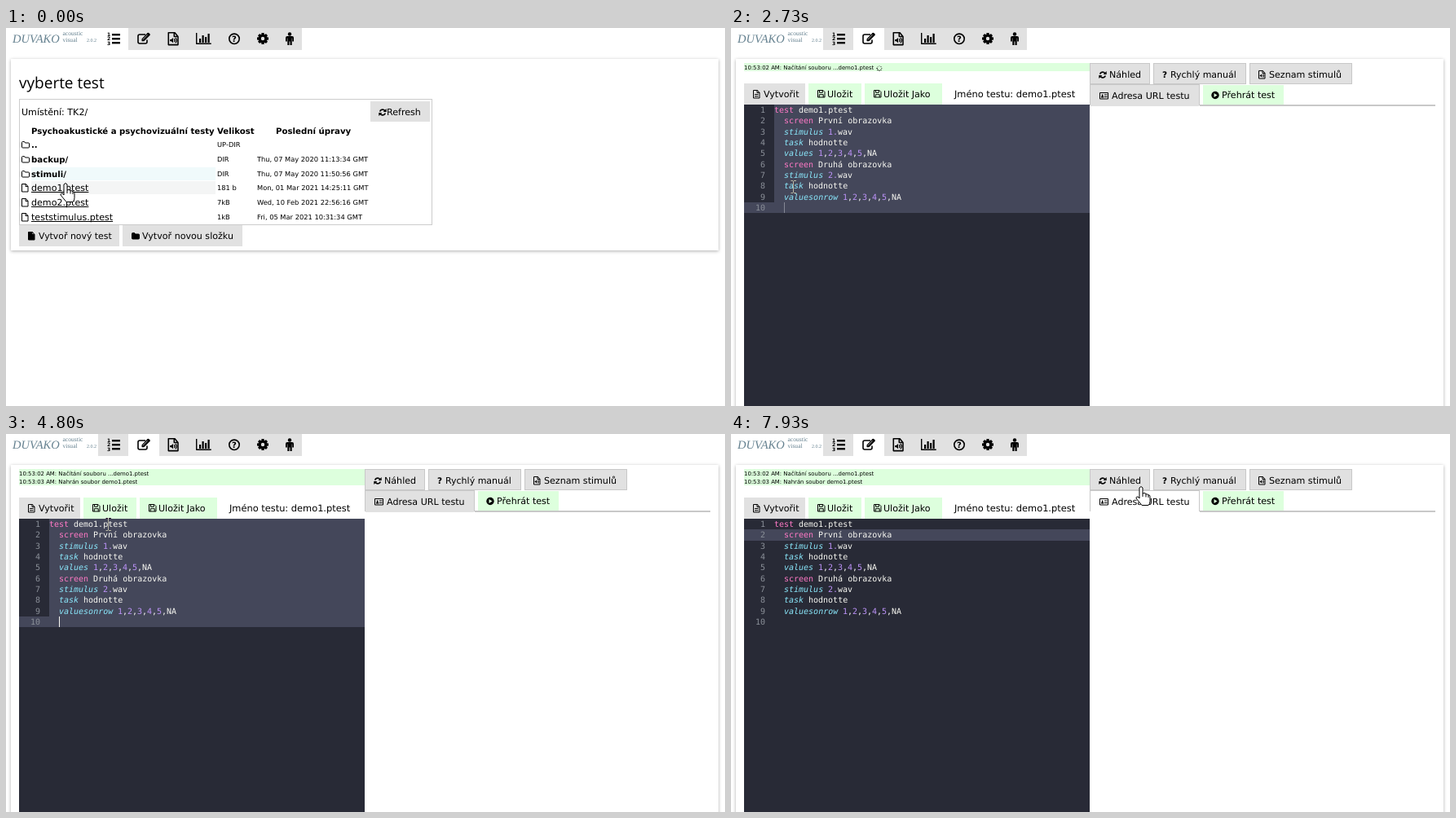
Write an HTML page with a canvas that moves like this. It is 882x464 px and loops after 8 s.

```html
<!DOCTYPE html>
<html lang="cs">
<head>
<meta charset="utf-8">
<title>Editor testů</title>
<style>
html, body { margin: 0; width: 100%; height: 100%; overflow: hidden; background: #fff; }
canvas { display: block; }
</style>
</head>
<body>
<canvas id="stage" width="882" height="464"></canvas>
<script>
const ctx = document.getElementById('stage').getContext('2d');
ctx.textRendering = 'geometricPrecision';

const LOOP = 8000, OPEN = 1530, LOADED = 2900, FOCUS = 4730, CLICK1 = 4865, CLICK2 = 6070;
const SANS = '"DejaVu Sans", sans-serif', SERIF = '"Liberation Serif", serif', MONO = '"DejaVu Sans Mono", monospace';
const GRAY = '#e1e1e1', GREEN = '#ddffdd', DARK = '#282a36', SELECTED = '#44475a';
const ROW = 13.33;

const ramp = (t, from, to) => Math.max(0, Math.min(1, (t - from) / (to - from)));

function box(x, y, w, h, color) {
  ctx.fillStyle = color;
  ctx.fillRect(x, y, w, h);
}
function write(str, x, y, font = '11.1px ' + SANS, color = '#000', align = 'left') {
  ctx.font = font;
  ctx.fillStyle = color;
  ctx.textAlign = align;
  ctx.fillText(str, x, Math.round(y));
}
function shape(d, x, y, { fill, stroke, width = 1, scale = 1 }) {
  const path = new Path2D(d);
  ctx.save();
  ctx.translate(x, y);
  ctx.scale(scale, scale);
  ctx.lineJoin = 'round';
  if (fill) { ctx.fillStyle = fill; ctx.fill(path, 'evenodd'); }
  if (stroke) { ctx.strokeStyle = stroke; ctx.lineWidth = width; ctx.stroke(path); }
  ctx.restore();
}
function disc(x, y, r, color = '#000') {
  ctx.fillStyle = color;
  ctx.beginPath();
  ctx.arc(x, y, r, 0, 7);
  ctx.fill();
}
function arc(x, y, r, from, to, width) {
  ctx.strokeStyle = '#000';
  ctx.lineWidth = width;
  ctx.beginPath();
  ctx.arc(x, y, r, from, to);
  ctx.stroke();
}

// Icons
const SOLID = { fill: '#000' }, LINE = { stroke: '#000' }, BOTH = { fill: '#000', stroke: '#000' };
const folder = (x, y, style = LINE) => shape('M.5 1.5q0-1 1-1h2l1 1.5h4q1 0 1 1v4q0 1-1 1h-7q-1 0-1-1z', x, y, style);
const page = (x, y, style = LINE) => shape('M.5.5h5l2.5 3v6.5h-7.5zM5 .5v3h3', x, y, style);
const textPage = (x, y) => { page(x, y); shape('M2 5.5h4.5M2 7.8h4.5', x, y, LINE); };
const soundPage = (x, y, scale = 1) => {
  page(x, y, { stroke: '#000', scale });
  shape('M1.7 5.8h1l1.5-1.3v4l-1.5-1.3h-1z', x, y, { fill: '#000', scale });
  shape('M5 5.3q1 1.2 0 2.4M6 4.4q1.8 2 0 4.2', x, y, { stroke: '#000', width: .8, scale });
};
const floppy = (x, y) => shape('M.5.5h6.5l2 2v6.5h-8.5zM2.5.5v2.8h3.8v-2.8M2.3 9v-3.3h4.9v3.3', x, y, LINE);
function refresh(x, y) {
  arc(x, y, 3.4, 3.4, 5.8, 1.6);
  arc(x, y, 3.4, .3, 2.7, 1.6);
  shape('M4.7-4.5v4h-4zM-4.7 4.5v-4h4z', x, y, SOLID);
}
function gear(x, y) {
  ctx.save();
  ctx.translate(x, y);
  for (let i = 0; i < 8; i++) {
    box(-1.6, -7, 3.2, 4, '#000');
    ctx.rotate(Math.PI / 4);
  }
  ctx.restore();
  arc(x, y, 3.9, 0, 7, 3.4);
}

function navigation(t) {
  const steel = '#64808f';
  write('DUVAKO', 8, 18, 'italic 14.5px ' + SERIF, steel);
  write('acoustic', 69.5, 9, '7.6px ' + SERIF, steel);
  write('visual', 69.5, 17, '7.6px ' + SERIF, steel);
  write('2.0.2', 99, 17, '6px ' + SERIF, steel);

  const opened = ramp(t, OPEN, OPEN + 500);
  box(188, 0, 175, 27, GRAY);
  box(113, 0, 37, 27, `rgba(225,225,225,${opened})`);
  box(150, 0, 38, 27, `rgba(225,225,225,${1 - opened})`);

  for (let i = 0; i < 3; i++) {
    write(i + 1, 124, 10 + i * 5.4, 'bold 6px ' + SANS);
    box(130, 7 + i * 5, 10, 2.4, '#000');
  }
  shape('M10 1.5H3q-2 0-2 2v7q0 2 2 2h7q2 0 2-2V8', 161, 6.5, { stroke: '#000', width: 1.6 });
  shape('M5 7.5l7-7.5q1-.7 2 .3l1 1q.8 1 0 1.7l-7.2 7.2H5z', 161.5, 6, SOLID);
  shape('M6.3 8l5.7-6', 161.5, 6.2, { stroke: '#eee', width: .7 });
  soundPage(198.5, 5, 1.56);
  shape('M.7 0v13.3h18', 233, 6, { stroke: '#000', width: 1.4 });
  [5, 9, 7, 11].forEach((h, i) => box(237 + i * 3.5, 18 - h, 2.2, h, '#000'));
  arc(280, 13.3, 6.2, 0, 7, 1.6);
  write('?', 280, 17, 'bold 10px ' + SANS, '#000', 'center');
  gear(315, 13);
  disc(348, 7.5, 2.2);
  shape('M-3 0h6q2 0 2 2v4.5h-1.8v-4h-.5v8.5h-2.2v-4.5h-1v4.5h-2.2v-8.5h-.5v4H-5v-4.5q0-2 2-2z', 348, 10, SOLID);
}

function card(height) {
  ctx.save();
  ctx.shadowColor = 'rgba(0,0,0,.32)';
  ctx.shadowBlur = 4;
  ctx.shadowOffsetY = 1;
  box(6, 38, 868, height, '#fff');
  ctx.restore();
}

const FILES = [
  ['..', 'UP-DIR', ''],
  ['backup/', 'DIR', 'Thu, 07 May 2020 11:13:34 GMT'],
  ['stimuli/', 'DIR', 'Thu, 07 May 2020 11:50:56 GMT'],
  ['demo1.ptest', '181 b', 'Mon, 01 Mar 2021 14:25:11 GMT'],
  ['demo2.ptest', '7kB', 'Wed, 10 Feb 2021 22:56:16 GMT'],
  ['teststimulus.ptest', '1kB', 'Fri, 05 Mar 2021 10:31:34 GMT'],
];

function fileList(t) {
  const bold = 'bold 10.2px ' + SANS, small = '8.3px ' + SANS;
  const hover = ramp(t, 30, 200);
  card(235);
  write('vyberte test', 16, 74, '19px "Open Sans", sans-serif');
  ctx.strokeStyle = '#ccc';
  ctx.lineWidth = 1;
  ctx.strokeRect(16.5, 87.5, 506, 154);
  write('Umístění: TK2/', 19, 107);
  box(447, 90, 73, 25, GRAY);
  refresh(462, 103.5);
  write('Refresh', 467, 107);
  write('Psychoakustické a psychovizuální testy', 31, 130, 'bold 10.1px ' + SANS);
  write('Velikost', 259, 130, bold);
  write('Poslední úpravy', 331, 130, bold);

  box(31, 171, 226, 16, `rgba(180,228,235,${.2 * (1 - hover)})`);
  box(31, 188, 226, 16, '#f4f5f5');
  box(31, 188, 226, 16, `rgba(135,206,235,${hover})`);
  FILES.forEach(([name, size, date], i) => {
    const y = Math.round(147 + i * 17.8), isFile = i > 2;
    (isFile ? page : folder)(19, y - (isFile ? 9 : 8));
    write(name, 31, y, isFile ? undefined : bold);
    if (isFile) box(31, y + 1, ctx.measureText(name).width, 1, '#000');
    write(size, 259, y - 1, small);
    write(date, 308, y - 1, small);
  });
  box(16, 242, 123, 26, GRAY);
  page(27, 250, BOTH);
  write('Vytvoř nový test', 40, 259, '10.9px ' + SANS);
  box(143, 242, 147, 26, GRAY);
  folder(154, 251, BOTH);
  write('Vytvoř novou složku', 167, 259);
}

const CODE = [
  'test demo1.ptest', '  screen První obrazovka', '  stimulus 1.wav', '  task hodnotte', '  values 1,2,3,4,5,NA',
  '  screen Druhá obrazovka', '  stimulus 2.wav', '  task hodnotte', '  valuesonrow 1,2,3,4,5,NA', '',
];

function codeLine(line, y) {
  const [, indent, word, rest] = line.match(/^( *)(\w*)(.*)$/);
  const major = /^(test|screen)$/.test(word);
  let x = 53 + indent.length * 6;
  const put = (str, color, style = '') => {
    write(str, x, y, style + '10px ' + MONO, color);
    x += str.length * 6;
  };
  put(word, major ? '#ff79c6' : '#8be9fd', major ? '' : 'italic ');
  for (const part of major ? [rest] : rest.match(/\d\.?|\D+/g) || [])
    put(part, !major && /\d/.test(part) ? '#bd93f9' : '#f8f8f2');
}

function codeEditor(t, top) {
  const rowTop = i => Math.round(top + i * ROW);
  const [active, caretX] = t < CLICK1 ? [9, 65] : t < CLICK2 ? [0, 125] : [1, 137];
  box(16, top, 424, 464 - top, DARK);
  if (t < CLICK1) box(53, top, 387, rowTop(9) - top, SELECTED);
  box(16, rowTop(active), 424, rowTop(active + 1) - rowTop(active), SELECTED);
  CODE.forEach((line, i) => {
    const y = rowTop(i) + 10;
    write(i + 1, 42, y, '10px ' + MONO, '#8a8f98', 'right');
    codeLine(line, y);
  });
  const since = t - (t < CLICK2 ? CLICK1 : CLICK2);
  if (t < CLICK1 || since % 1000 < 500)
    box(caretX, rowTop(active), 1, 13, t < FOCUS ? '#858895' : '#f8f8f2');
}

function tab(x, y, w, color = GRAY) {
  box(x, y, w, 26, color);
  ctx.strokeStyle = '#c8c8c8';
  ctx.lineWidth = 1;
  ctx.strokeRect(x + .5, y + .5, w - 1, 25);
}

function testEditor(t) {
  const shift = t < LOADED ? 0 : 10, tiny = '6.9px ' + SANS;
  card(500);
  box(16, 43, 424, 10 + shift, GREEN);
  write('10:53:02 AM: Načítání souboru ...demo1.ptest', 16, 51, tiny);
  if (shift) write('10:53:03 AM: Nahrán soubor demo1.ptest', 16, 61, tiny);
  else for (let i = 0; i < 8; i++) {
    const a = (i + Math.floor(t / 125)) * Math.PI / 4;
    disc(182 + 2.8 * Math.cos(a), 49.5 + 2.8 * Math.sin(a), .4 + i * .06);
  }

  const y = 68 + shift, saveHover = ramp(t, 3900, 4100) - ramp(t, 4270, 4400);
  box(16, y, 75, 26, GRAY);
  textPage(27, y + 8);
  write('Vytvořit', 40, y + 17);
  box(95, y, 65, 26, GREEN);
  box(95, y, 65, 26, `rgba(255,255,255,${saveHover})`);
  floppy(106, y + 8);
  write('Uložit', 118, y + 17);
  box(164, y, 95, 26, GREEN);
  floppy(175, y + 8);
  write('Uložit Jako', 187, y + 17);
  write('Jméno testu: demo1.ptest', 274, y + 17, '11.4px ' + SANS);
  codeEditor(t, 94 + shift);

  tab(440, 43, 74);
  refresh(456, 57.5);
  write('Náhled', 464, 61);
  tab(518, 43, 114);
  write('?', 529, 61, 'bold 10.5px ' + SANS);
  write('Rychlý manuál', 539, 61, '11px ' + SANS);
  tab(636, 43, 126);
  soundPage(647, 52);
  write('Seznam stimulů', 660, 61);

  const shade = Math.round(225 + 30 * ramp(t, 7560, 7800));
  const urlColor = `rgb(${shade},${shade},${shade})`;
  tab(440, 69, 135, urlColor);
  box(441, 94, 133, 2, urlColor);
  box(575, 94, 289, 2, '#c8c8c8');
  shape('M.5.5h10v7.5h-10zM6 3h3.5M6 5.5h3.5', 452, 79, LINE);
  shape('M2 6.5v-1.5h.8v-2.5h1.6v2.5h.8v1.5z', 452, 79, SOLID);
  write('Adresa URL testu', 467, 87);
  box(579, 70, 99, 24, GREEN);
  disc(594, 82.5, 4.7);
  shape('M-1.5-2.5l4 2.5-4 2.5z', 594, 82.5, { fill: GREEN });
  write('Přehrát test', 602, 86);
}

// Pointer path: time, x, y
const PATH = [
  [0, 73, 191], [70, 73, 191], [200, 76, 193], [1529, 76, 193], [OPEN, 76, 195], [3350, 76, 195],
  [3600, 93, 139], [3900, 115, 100], [4200, 128, 90], [4400, 125, 111], [4730, 125, 111], [5330, 128, 112],
  [5420, 128, 112], [5670, 138.5, 141], [5850, 138.5, 141], [6030, 138, 125], [6090, 138, 125],
  [6270, 141, 147.5], [6950, 141, 147.5], [7800, 547, 74], [7930, 503, 65], [LOOP, 503, 65],
];

function pointer(t) {
  const n = PATH.findIndex(p => p[0] > t);
  const [t0, x0, y0] = PATH[n - 1], [t1, x1, y1] = PATH[n];
  const k = (t - t0) / (t1 - t0), x = Math.round(x0 + (x1 - x0) * k), y = Math.round(y0 + (y1 - y0) * k);
  const style = { fill: '#fff', stroke: '#000' };
  if (t < OPEN || y < 104) {
    shape('M-2 1q2-3 4 0v7l2-.5q2 0 2 1.5 2-1 3 1 2-.5 2 1.5v6q0 3-2 5h-8l-7-8.5q0-3 3-1.5l1 1.5z', x, y, style);
    shape('M2 8v4M6 9v3.5M9 10v3', x, y, LINE);
  } else if (t > 3400 && t < 4320) {
    shape('M.5.5v15.5l3.7-3.5 2.8 6 2.3-1-2.8-5.8h5z', x, y, style);
  } else {
    ctx.globalCompositeOperation = 'difference';
    shape('M-3-7.5h2.5M.5-7.5h3M0-7v14M-3 7.5h2.5M.5 7.5h3', x + .5, y, { stroke: '#fff' });
    ctx.globalCompositeOperation = 'source-over';
  }
}

function frame() {
  const t = performance.now() % LOOP;
  box(0, 0, 882, 464, '#fff');
  if (t < OPEN) fileList(t); else testEditor(t);
  navigation(t);
  pointer(t);
  requestAnimationFrame(frame);
}
frame();
</script>
</body>
</html>
```
